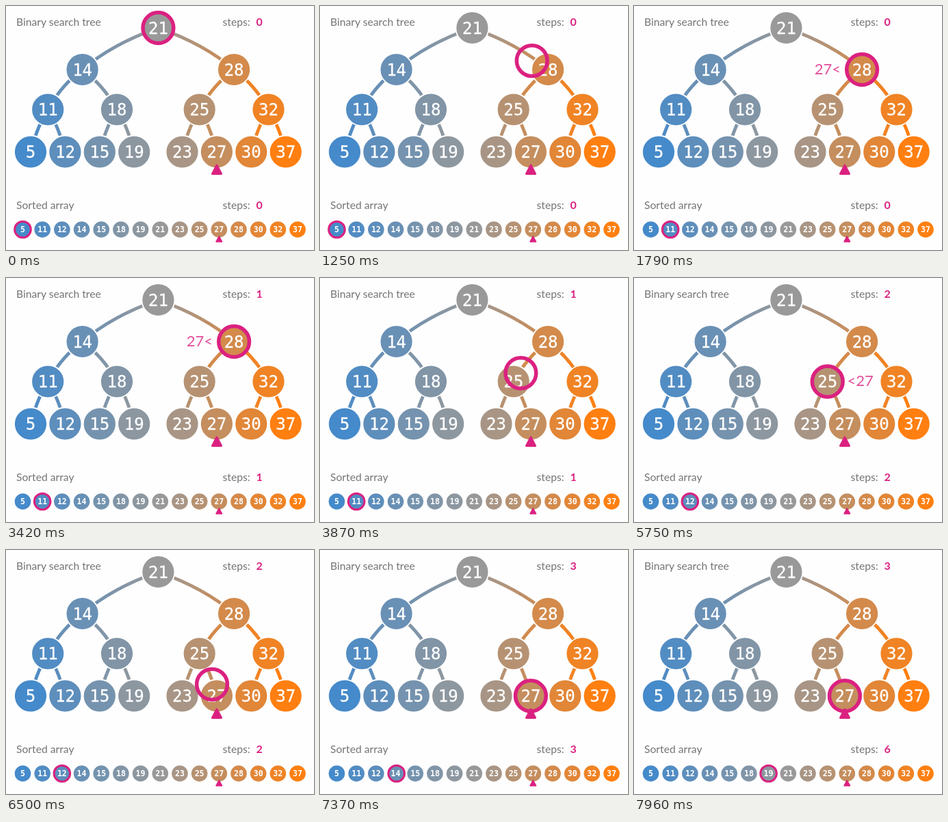
An HTML page that plays this animation: 450 by 357 pixels, repeating every 8000 ms.

```html
<!DOCTYPE html>
<html lang="en">
<head>
<meta charset="utf-8">
<title>Binary search tree and sorted array</title>
<style>
  html, body { margin: 0; height: 100%; overflow: hidden; background: #fefefe; }
  svg { display: block; width: 450px; height: 357px; }
  text { font: 15.7px Lato, sans-serif; fill: #747474; }
  .key, .cell { font: 24px "DejaVu Sans Mono", monospace; fill: #fff; text-anchor: middle; }
  .key { stroke: #fff; stroke-width: 0.3px; }
  .cell { font-size: 11.6px; font-weight: bold; }
  .count { font-size: 16px; font-weight: bold; fill: #db2180; }
  .compare { font-size: 22px; fill: #db2180; }
  .ring { fill: none; stroke: #db2180; }
  .mark { fill: #db2180; stroke: #db2180; stroke-linejoin: round; }
</style>
</head>
<body>
<svg id="stage" viewBox="0 0 450 357"></svg>
<script>
const stage = document.getElementById('stage');
const keys = [5, 11, 12, 14, 15, 18, 19, 21, 23, 25, 27, 28, 30, 32, 37];
const levels = [213.5, 151.5, 93, 32];
const FPS = 24, LOOP = 8000;

function add(tag, attrs, content, parent = stage) {
  const el = document.createElementNS('http://www.w3.org/2000/svg', tag);
  for (const name in attrs) el.setAttribute(name, attrs[name]);
  if (content !== undefined) el.textContent = content;
  parent.append(el);
  return el;
}

// Blue to grey to orange across the sorted keys.
function color(i) {
  const [a, b] = i < 7 ? [[69, 138, 202], [153, 153, 153]] : [[153, 153, 153], [255, 127, 16]];
  const p = i < 7 ? i / 7 : (i - 7) / 7;
  return `rgb(${a.map((v, n) => Math.round(v + (b[n] - v) * p))})`;
}

// In-order index gives the place; trailing zero bits of i + 1 give the height.
const height = i => Math.log2((i + 1) & -(i + 1));
const treePos = i => [36 + 25.2 * i + (i > 7 ? 19.9 : i === 7 ? 10 : 0), levels[height(i)]];
const cellPos = i => [24.5 + 28.68 * i, 327];

// The long root edges blend; the others take the colour of their larger key.
function edge(i, j) {
  const [x1, y1] = treePos(i), [x2, y2] = treePos(j);
  const cx = (x1 + x2) / 2 + (x2 - x1) * 0.11;
  const cy = (y1 + y2) / 2 - (y2 - y1) * 0.11;
  const id = `edge${j}`;
  let stroke = color(Math.max(i, j));
  if (height(i) === 3) {
    const blend = add('linearGradient', { id, gradientUnits: 'userSpaceOnUse', x1, y1, x2, y2 });
    add('stop', { offset: 0, 'stop-color': color(i) }, '', blend);
    add('stop', { offset: 1, 'stop-color': color(j) }, '', blend);
    stroke = `url(#${id})`;
  }
  add('path', { d: `M${x1} ${y1}Q${cx} ${cy} ${x2} ${y2}`, fill: 'none', stroke, 'stroke-width': 4.9 });
}

keys.forEach((_, i) => {
  const h = height(i);
  if (h) for (const side of [-1, 1]) edge(i, i + side * 2 ** (h - 1));
});

keys.forEach((key, i) => {
  const [x, y] = treePos(i), [cx, cy] = cellPos(i);
  add('circle', { cx: x, cy: y, r: 24, fill: color(i), stroke: '#fefefe', 'stroke-width': 1.8 });
  add('text', { class: 'key', x, y: y + 8.6 }, key);
  add('circle', { cx, cy, r: 11.8, fill: color(i) });
  add('text', { class: 'cell', x: cx, y: cy + 4.2 }, key);
});

add('path', { class: 'mark', d: 'M308 233L314.5 245.5H301.5Z', 'stroke-width': 3 });
add('path', { class: 'mark', d: 'M311.3 337.5L315.3 344.8H307.3Z', 'stroke-width': 2 });

function header(title, y) {
  add('text', { x: 15, y }, title);
  add('text', { x: 316.5, y }, 'steps:');
  return add('text', { class: 'count', x: 365.5, y }, 0);
}
const treeCount = header('Binary search tree', 29);
const arrayCount = header('Sorted array', 297);

const less = add('text', { class: 'compare', x: 263.7, y: 100.3 }, '27<');
const more = add('text', { class: 'compare', x: 311.6, y: 158.3 }, '<27');
const treeRing = add('circle', { class: 'ring', r: 22.4, 'stroke-width': 5.5 });
const arrayRing = add('circle', { class: 'ring', r: 11.8, 'stroke-width': 3 });

// Moves: first tick, last tick, index reached.
const treeMoves = [[23, 34, 11], [86, 97, 9], [150, 160, 10]];
const arrayMoves = [[34, 39, 1], [97, 102, 2], [157, 162, 3], [176, 181, 4], [181, 186, 5], [186, 191, 6]];
const treeTicks = [44, 102, 162];
const arrayTicks = [44, 102, 162, 181, 186, 191];

const ramp = (f, a, b) => Math.min(1, Math.max(0, (f - a) / (b - a)));
const ease = p => p < 0.5 ? (2 * p) ** 2.7 / 2 : 1 - (2 - 2 * p) ** 2.7 / 2;
const passed = (f, ticks) => ticks.filter(t => f >= t).length;

function place(ring, f, start, moves, pos) {
  let [x, y] = pos(start);
  for (const [a, b, i] of moves) {
    const p = ease(ramp(f, a, b)), [tx, ty] = pos(i);
    x += (tx - x) * p;
    y += (ty - y) * p;
  }
  ring.setAttribute('cx', x);
  ring.setAttribute('cy', y);
}

function draw(now) {
  const f = Math.floor((now % LOOP + 6) * FPS / 1000);
  place(treeRing, f, 7, treeMoves, treePos);
  place(arrayRing, f, 0, arrayMoves, cellPos);
  treeCount.textContent = passed(f, treeTicks);
  arrayCount.textContent = passed(f, arrayTicks);
  less.setAttribute('opacity', ramp(f, 39, 44) - ramp(f, 81, 86));
  more.setAttribute('opacity', ramp(f, 111, 116) - ramp(f, 137, 142));
}

function tick() {
  draw(performance.now());
  requestAnimationFrame(tick);
}
tick();
</script>
</body>
</html>
```
